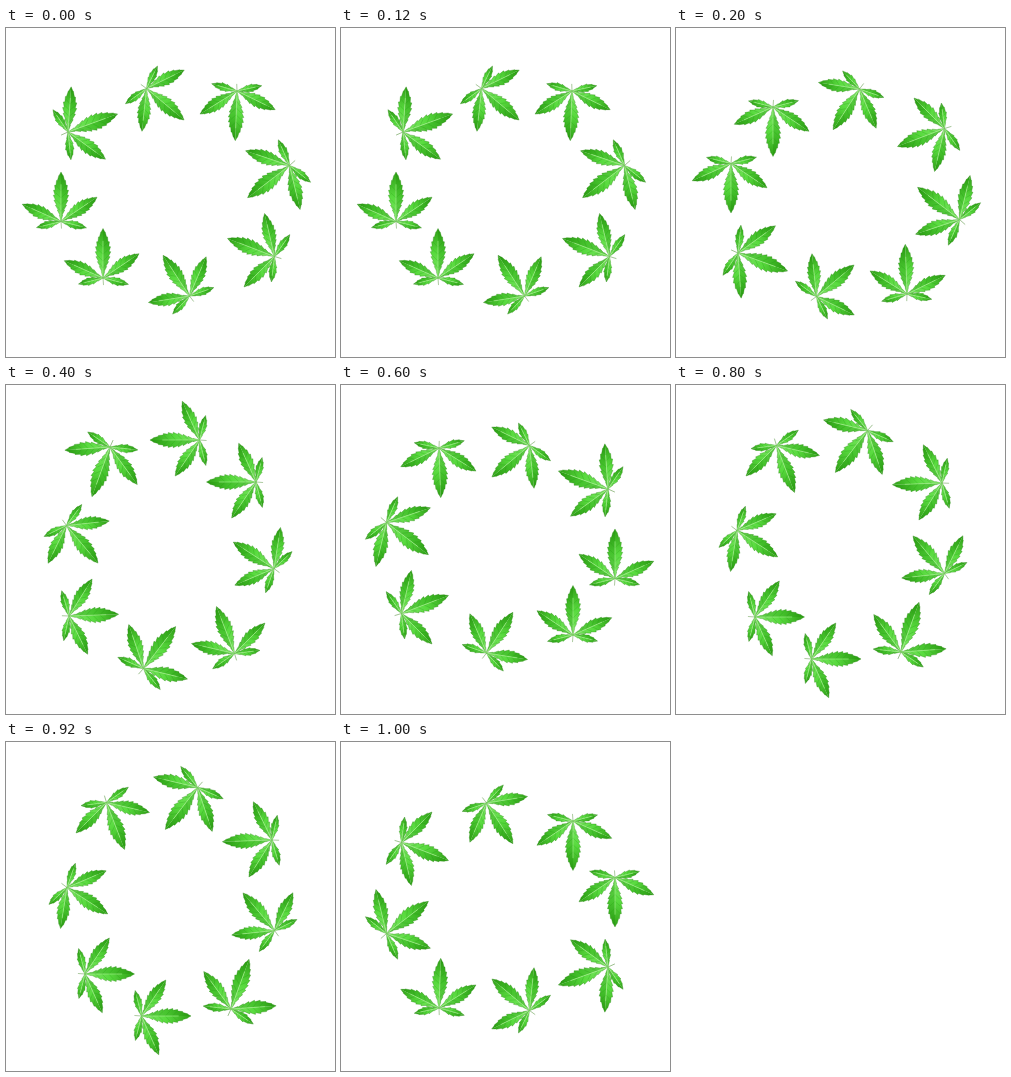
Write an HTML page with a canvas that moves like this. It is 329 px wide and 329 px high and loops after 1200 ms.

```html
<!DOCTYPE html>
<html lang="en">
<head>
<meta charset="utf-8">
<title>Ring of leaves</title>
<style>
  html, body { margin: 0; width: 100%; height: 100%; overflow: hidden; background: #fff; }
  canvas { display: block; }
</style>
</head>
<body>
<canvas id="stage" width="329" height="329"></canvas>
<script>
const ctx = document.getElementById('stage').getContext('2d');
const SIZE = 329, STEP = 200;

// Hub x, hub y, turn in degrees
const leaves = [
  [55, 193.5, 0],
  [97, 250, 0],
  [62, 104, 70],
  [140.5, 60.5, 130],
  [231, 63, 182],
  [283.5, 137.5, 232.5],
  [268.5, 228.5, 291],
  [183.5, 268, 327]
];

// Angle from the main axis, length; the small ones lie at the back
const blades = [[-104, 25], [104, 26], [-66, 42], [56, 43], [0, 49]];

// Quarter turns of the whole ring; all but the first and last are also mirrored
const quarters = [0, 2, 3, 0, 1, 2];

const rad = deg => deg * Math.PI / 180;

// Half width of a blade from hub (0) to tip (1)
const profile = t => Math.sin(Math.PI * t ** 1.08) ** 1.15;

function line(x1, y1, x2, y2, color, width) {
  ctx.beginPath();
  ctx.moveTo(x1, y1);
  ctx.lineTo(x2, y2);
  ctx.strokeStyle = color;
  ctx.lineWidth = width;
  ctx.stroke();
}

function halfBlade(side, len, half) {
  const teeth = Math.round(len / 5);
  ctx.beginPath();
  ctx.moveTo(0, 0);
  for (let i = 1; i < teeth; i++) {
    const t = i / teeth, w = side * half * profile(t);
    ctx.lineTo(w * 1.1, -len * (t + 0.03));
    ctx.lineTo(w * 0.85, -len * (t + 0.035));
  }
  ctx.lineTo(0, -len);
}

function blade([angle, len]) {
  const half = len * 0.143;
  ctx.save();
  ctx.rotate(rad(angle));
  const tone = ctx.createLinearGradient(0, 0, 0, -len);
  tone.addColorStop(0, '#84e86c');
  tone.addColorStop(0.5, '#58da3e');
  tone.addColorStop(1, '#2f9f16');
  for (const side of [-1, 1]) {
    halfBlade(side, len, half);
    ctx.fillStyle = tone;
    ctx.fill();
    if (side > 0) {
      ctx.fillStyle = 'rgba(20,130,0,.25)';
      ctx.fill();
    }
    ctx.strokeStyle = 'rgba(35,130,10,.6)';
    ctx.lineWidth = 0.5;
    ctx.stroke();
    for (let t = 0.25; t < 0.8; t += 0.14) {
      const w = side * half * profile(t) * 0.75;
      line(0, -len * (t - 0.05), w, -len * (t + 0.05), 'rgba(28,140,14,.4)', 0.5);
    }
  }
  line(0, 0, 0, -len * 0.75, '#a4ee8c', 0.6);
  ctx.restore();
}

function leaf([x, y, turn]) {
  const scale = 1.035 + 0.045 * Math.cos(rad(2 * (turn - 61)));
  ctx.save();
  ctx.translate(x, y);
  ctx.rotate(rad(turn));
  ctx.scale(scale, scale);
  line(0, 0, 0.5, 7, '#8bb47a', 0.7);
  blades.forEach(blade);
  ctx.restore();
}

function draw() {
  const pose = Math.floor(performance.now() / STEP) % quarters.length;
  ctx.clearRect(0, 0, SIZE, SIZE);
  ctx.save();
  ctx.translate(SIZE / 2, SIZE / 2);
  ctx.rotate(rad(90 * quarters[pose]));
  ctx.scale(pose % 5 ? -1 : 1, 1);
  ctx.translate(-SIZE / 2, -SIZE / 2);
  leaves.forEach(leaf);
  ctx.restore();
  requestAnimationFrame(draw);
}
draw();
</script>
</body>
</html>
```
